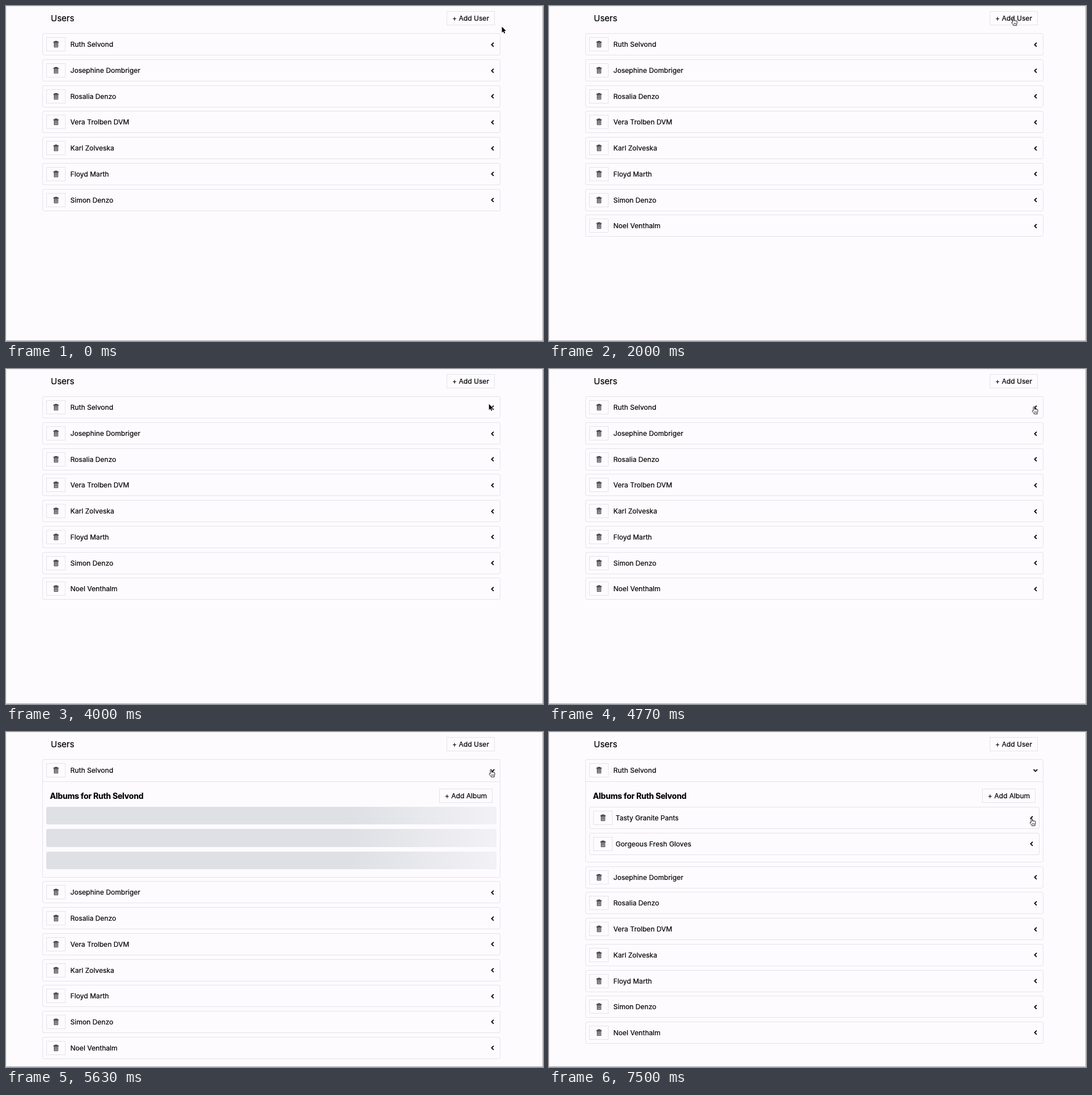
Write an HTML page that moves like this. It is 947 by 591 pixels and loops after 8000 ms.

```html
<!DOCTYPE html>
<html lang="en">
<head>
<meta charset="utf-8">
<title>Users</title>
<style>
  * { box-sizing: border-box; }
  html, body { margin: 0; width: 100%; height: 100%; overflow: hidden; }
  body { position: relative; background: #fdfbfe; color: #000; font: 12.1px Inter, sans-serif; -webkit-text-stroke: .2px; }
  body > *, .row > .chevron { position: absolute; }
  #edge { inset: 0; border: 1px solid; border-color: #e9e8ea #b0afb2 #a5a4a7 #e9e8ea; }
  .title { line-height: 26px; white-space: nowrap; }
  .row, .button { border: 1px solid #e3e4e8; }
  .row { border-radius: 3px; }
  .head { display: flex; align-items: center; height: 37px; padding-left: 6px; white-space: nowrap; }
  .button { display: flex; align-items: center; justify-content: center; height: 25px; white-space: nowrap; }
  .trash { width: 34px; margin-right: 8.5px; }
  .trash svg { width: 10.4px; height: 12.8px; }
  .album .trash { margin-right: 5.5px; }
  .chevron { right: 9px; top: 12.5px; width: 7.8px; height: 12.5px; stroke: #000; stroke-width: .4; }
  .user { left: 64px; width: 808px; height: 39px; }
  .album { left: 71px; width: 794px; height: 39px; }
  .panel { border-top: 1px solid #e3e4e8; }
  .bar { left: 71px; width: 794px; height: 31.3px; border-radius: 3px; overflow: hidden; background: #dee0e5; }
  .bar div { height: 100%; background: linear-gradient(90deg, #dee0e5, #fdfbfe, #dee0e5); }
  #cursor { left: 0; top: 0; width: 20px; height: 20px; overflow: visible; }
  [hidden] { display: none !important; }
</style>
</head>
<body>
<svg width="0" height="0">
  <symbol id="trash" viewBox="0 0 13 16">
    <path d="M11 2H9c0-.55-.45-1-1-1H5c-.55 0-1 .45-1 1H2c-.55 0-1 .45-1 1v1c0 .55.45 1 1 1v9c0 .55.45 1 1 1h7c.55 0 1-.45 1-1V5c.55 0 1-.45 1-1V3c0-.55-.45-1-1-1zm-1 12H3V5h1v8h1V5h1v8h1V5h1v8h1V5h1v9zm1-10H2V3h9v1z"/>
  </symbol>
  <symbol id="left" viewBox="-1.25 0 10 16"><path d="M5.5 3L7 4.5 3.25 8 7 11.5 5.5 13l-5-5 5-5z"/></symbol>
  <symbol id="down" viewBox="0 0 10 16"><path d="M5 11L0 6l1.5-1.5L5 8.25 8.5 4.5 10 6l-5 5z"/></symbol>
</svg>
<div id="edge"></div>
<div class="title" style="left:79px;top:9px;font-size:15px">Users</div>
<div class="button" style="left:777px;top:9px;width:85px">+ Add User</div>
<svg id="cursor">
  <path id="arrow" d="M0 0V10.4L2.4 8.2 4 12 5.7 11.3 4.1 7.6H7.4Z" stroke="#fff" stroke-width="1.2" paint-order="stroke"/>
  <g id="hand" transform="translate(-3.5 -.8)" fill="#fff" stroke="#111" stroke-width=".95" stroke-linejoin="round">
    <path d="M2.6 1.9a1.1 1.1 0 0 1 2.2 0V5.6a.9.9 0 0 1 1.9.1a.9.9 0 0 1 1.9.4a.85.85 0 0 1 1.8.6V9.6L9.6 11.6V13.6H4L3.6 12.2 .8 8.9a.9.9 0 0 1 1.4-1.1L2.6 8.2Z"/>
    <path d="M5 9v2.6M6.6 9v2.6M8.2 9v2.6" stroke-width=".7"/>
  </g>
</svg>
<script>
const LOOP = 8000, ADDED = 1970, OPENED = 4830, LOADED = 5830;
const TOP = 48.3, PITCH = 45.7;
const names = ['Ruth Selvond', 'Josephine Dombriger', 'Rosalia Denzo', 'Vera Trolben DVM',
  'Karl Zolveska', 'Floyd Marth', 'Simon Denzo', 'Noel Venthalm'];
const albums = ['Tasty Granite Pants', 'Gorgeous Fresh Gloves'];

// Cursor hot spot: time, x, y
const path = [
  [0, 874.5, 36.5], [900, 874.5, 36.5], [1430, 818.5, 21.5], [3530, 818.5, 21.5],
  [4160, 858, 69.5], [4330, 856, 67.5], [4470, 856, 67.5], [4500, 855, 66.5],
  [6970, 855, 66.5], [7500, 851, 152.5], [LOOP, 851, 152.5]
];
// Clickable areas: left, top, right, bottom
const links = [[777, 9, 862, 34], [853, 61, 863, 75], [846, 145, 856, 158]];

const $ = id => document.getElementById(id);
const icon = (id, cls = '') => `<svg class="${cls}"><use href="#${id}"/></svg>`;

function add(cls, top, html, style = '') {
  const el = document.createElement('div');
  el.className = cls;
  el.style.cssText = `top:${top}px;${style}`;
  el.innerHTML = html;
  document.body.insertBefore(el, $('cursor'));
  return el;
}

const addRow = (kind, top, name) => add(`row ${kind}`, top,
  `<div class="head"><div class="button trash">${icon('trash')}</div>${name}</div>${icon('left', 'chevron')}`);

const users = names.map((name, i) => addRow('user', TOP + PITCH * i, name));
const panel = [
  add('panel', 87, '', 'left:65px;width:806px'),
  add('title', 100, `Albums for ${names[0]}`, 'left:77.5px;font-size:14px;font-weight:700;letter-spacing:-.2px'),
  add('button', 100, '+ Add Album', 'left:764px;width:94px')
];
const bars = [0, 1, 2].map(i => add('bar', 132 + 39.3 * i, '<div></div>'));
const albumRows = albums.map((name, i) => addRow('album', 132 + PITCH * i, name));
const shimmers = bars.map(bar => {
  const anim = bar.firstChild.animate(
    { transform: ['translateX(-100%)', 'translateX(100%)'] },
    { duration: 1500, easing: 'ease', fill: 'both' });
  anim.pause();
  return anim;
});
const chevron = users[0].querySelector('.chevron use');

function cursorAt(t) {
  const i = path.findIndex(p => p[0] > t);
  const [t0, x0, y0] = path[i - 1], [t1, x1, y1] = path[i];
  const u = (t - t0) / (t1 - t0), k = u * u * (3 - 2 * u);
  const bulge = t0 === 6970 ? 8 * Math.sin(Math.PI * k) : 0;
  return [x0 + (x1 - x0) * k + bulge, y0 + (y1 - y0) * k];
}

const show = (els, on) => els.forEach(el => { el.hidden = !on; });

function render(t) {
  const open = t >= OPENED, loaded = t >= LOADED;
  const extra = loaded ? 142.7 : open ? 169.4 : 0;
  users.forEach((row, i) => { row.style.top = TOP + PITCH * i + (i && extra) + 'px'; });
  users[0].style.height = 39 + extra + 'px';
  users[7].hidden = t < ADDED;
  chevron.setAttribute('href', open ? '#down' : '#left');
  show(panel, open);
  show(bars, open && !loaded);
  show(albumRows, loaded);
  shimmers.forEach(anim => { anim.currentTime = Math.max(0, Math.min(1500, t - OPENED)); });

  const [x, y] = cursorAt(t);
  const over = links.some(([l, top, r, b]) => x > l && x < r && y > top && y < b);
  $('cursor').style.transform = `translate(${x}px,${y}px)`;
  $('hand').style.display = over ? '' : 'none';
  $('arrow').style.display = over ? 'none' : '';
}

function tick() {
  render(performance.now() % LOOP);
  requestAnimationFrame(tick);
}
tick();
</script>
</body>
</html>
```
